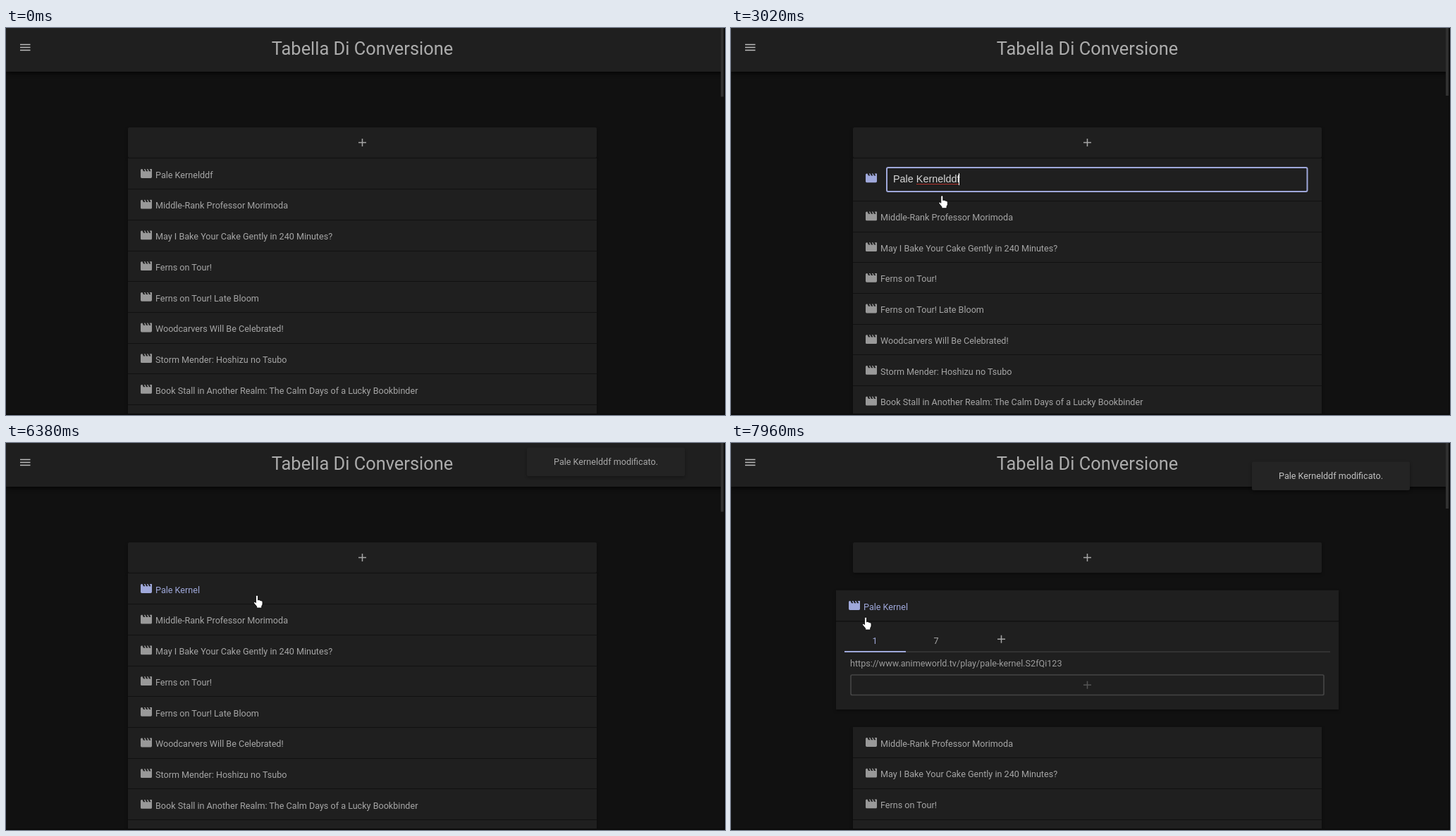
These frames come from a looping animation (1020 px wide and 549 px high, 8000 ms). An HTML page:

```html
<!DOCTYPE html>
<html lang="it">
<head>
<meta charset="utf-8">
<title>Tabella Di Conversione</title>
<style>
  html, body { margin: 0; width: 100%; height: 100%; overflow: hidden; background: #111; }
  svg { display: block; width: 1020px; height: 549px; font: 12.6px Roboto, sans-serif; }
  .field { font: 14.4px "Liberation Sans", Arial, sans-serif; }
  .shade { filter: drop-shadow(0 2px 2px rgba(0, 0, 0, .35)); }
</style>
</head>
<body>
<svg id="stage" viewBox="0 0 1020 549"></svg>
<script>
const LOOP = 8000, PITCH = 43.7, TOP = 185;
const PANEL = '#1f1f1f', BACK = '#111', GREY = '#a6a6a6', ACCENT = '#9fa8da';
const NAME = 'Pale Kernel';
const TITLES = [
  'Middle-Rank Professor Morimoda',
  'May I Bake Your Cake Gently in 240 Minutes?',
  'Ferns on Tour!',
  'Ferns on Tour! Late Bloom',
  'Woodcarvers Will Be Celebrated!',
  'Storm Mender: Hoshizu no Tsubo',
  'Book Stall in Another Realm: The Calm Days of a Lucky Bookbinder'
];
const MOVIE = 'M18 4l2 4h-3l-2-4h-2l2 4h-3l-2-4H8l2 4H7L5 4H4c-1.1 0-1.99.9-1.99 2L2 18c0 1.1.9 2 2 2h16c1.1 0 2-.9 2-2V4h-4z';
const HAND = 'M-1.5 1.5a1.5 1.5 0 0 1 3 0V7l1-.6 1.6.5.5.5 1.6.2.6.6c.9 0 1.2.5 1.2 1.5V13l-1.3 2.5V18h-7v-2L-4 11.5c-1-1.3.2-2.6 1.4-1.8l1.1 1z';
const ARROW = 'M0 0V15l3.5-3.3 2.2 5.2 2.2-1-2.2-5H10.5z';

// pointer path: time, x, y
const PATH = [[790, 133, 206], [860, 195, 202], [1000, 328, 189], [1260, 274, 206],
  [2130, 274, 206], [2540, 290.5, 241], [2890, 290.5, 241], [3460, 356, 216],
  [6930, 356, 216], [7070, 291.5, 216], [7820, 291.5, 216], [7960, 191, 247]];

const clamp = v => Math.max(0, Math.min(1, v));
const rect = (x, y, w, h, fill, more = '') =>
  `<rect x="${x}" y="${y}" width="${w}" height="${h}" fill="${fill}" ${more}/>`;
const text = (s, x, y, fill = GREY, more = '') =>
  `<text x="${x}" y="${Math.round(y)}" fill="${fill}" ${more}>${s}</text>`;
const plus = (x, y, color) =>
  `<path d="M${x - 5.5} ${y}h11M${x} ${y - 5.5}v11" stroke="${color}" stroke-width="1.5"/>`;
const movie = (x, y, color) =>
  `<path transform="translate(${x - 9.6} ${y - 9.6}) scale(.8)" d="${MOVIE}" fill="${color}"/>`;
const divider = y => rect(173, Math.round(y - .45), 665, 1, BACK);

function pointerAt(t) {
  if (t < PATH[0][0]) return null;
  const i = PATH.findIndex(k => k[0] > t);
  if (i < 0) return PATH[PATH.length - 1].slice(1);
  const [a, b] = [PATH[i - 1], PATH[i]];
  const u = (t - a[0]) / (b[0] - a[0]), e = u * u * (3 - 2 * u);
  return [a[1] + (b[1] - a[1]) * e, a[2] + (b[2] - a[2]) * e];
}

function header() {
  return rect(0, -10, 1020, 72, PANEL, 'style="filter:drop-shadow(0 2px 3px rgba(0,0,0,.8))"') +
    text('Tabella Di Conversione', 505.5, 38, '#acacac', 'text-anchor="middle" font-size="25.4"') +
    '<path d="M20 23.5h14.5M20 27.5h14.5M20 31.5h14.5" stroke="#bdbdbd" stroke-width="1.6"/>';
}

function rows(top) {
  let out = rect(173, top, 665, 600, PANEL);
  TITLES.forEach((title, i) => {
    const y = top + i * PITCH;
    out += movie(199, y + 21.5, '#999') + text(title, 212, y + 27.7);
  });
  for (let i = 1; i < 9; i++) out += divider(top + i * PITCH);
  return out;
}

function editRow(t) {
  const cut = [4250, 4520, 4980].filter(k => t >= k).length;
  const value = NAME + 'ddf'.slice(0, 3 - cut);
  const caret = [323.5, 320.5, 312.5, 304.5][cut];
  const caretOn = t < 3460 || t >= 4000;
  return rect(221, 198, 596.5, 34, 'none', `rx="2" stroke="${ACCENT}" stroke-width="2"`) +
    text(value, 230, 219, '#d8d8d8', 'class="field"') +
    (cut ? '' : rect(263, 221, 60, 1, '#b3322e')) +
    (caretOn ? rect(caret - .5, 206, 1, 17, '#fff') : '');
}

function card(p, color) {
  const x = 173 - 24 * p, y = TOP + 24 * p, w = 665 + 48 * p;
  const bar = Math.round(y + 87);
  return `<g class="shade">${rect(x, y, w, 169, PANEL)}</g>` +
    rect(x, Math.round(y + 43), w, 1.5, BACK) +
    movie(x + 26, y + 21.5, color) + text(NAME, x + 39, y + 27.7, color) +
    text('1', x + 55, y + 75.5, ACCENT, 'text-anchor="middle"') +
    text('7', x + 142, y + 75.5, GREY, 'text-anchor="middle"') +
    plus(x + 234.5, y + 69.3, GREY) +
    rect(x + 98, bar - .5, w - 110, 1.5, '#393939') +
    rect(x + 12, bar - 1, 87, 2, ACCENT) +
    text('https://www.animeworld.tv/play/pale-kernel.S2fQi123', x + 20, y + 108, '#9c9c9c') +
    rect(x + 21, y + 120, w - 42, 28.5, 'none', 'rx="2" stroke="#444" stroke-width="1.7"') +
    plus(505.5, y + 134.3, '#555');
}

function menu(active) {
  const item = (s, i) => text(s, 279.5, 224 + 24 * i, i === 1 && active ? '#8c8c8c' : '#d0d0d0');
  return `<g class="shade">${rect(274, 207, 47, 74, '#1d1d1d')}</g>` +
    rect(274, 231.5, 47, 1, BACK) + rect(274, 255.5, 47, 1, BACK) +
    ['Copy', 'Edit', 'Delete'].map(item).join('');
}

function toast(t) {
  const step = Math.floor((t - 6310) / 70);
  const u = clamp((step - 1) / 4);
  const dy = -20 * (1 - u) ** 2;
  return `<g transform="translate(0 ${dy})" opacity="${clamp(.5 + .35 * step)}">` +
    rect(739, 26.5, 224, 40.5, '#242424', 'rx="2" class="shade"') +
    text(NAME + 'ddf modificato.', 851, 51, '#c0c0c0', 'text-anchor="middle"') + '</g>';
}

function pointer([x, y], editing) {
  const at = `transform="translate(${x} ${y})"`;
  if (editing && x > 220 && y < 233)
    return `<path ${at} d="M-3 -6h2.2l.8.7.8-.7H3M0 -5.5V5.5M-3 6h2.2l.8-.7.8.7H3" fill="none" stroke="#ddd"/>`;
  return `<path ${at} d="${x < 173 ? ARROW : HAND}" fill="#fff" stroke="#000" stroke-width=".8"/>`;
}

function draw(t) {
  const menuOpen = t >= 1800 && t < 2890;
  const editing = t >= 2890 && t < 5580;
  const open = t >= 7350;
  const p = !open ? 0 : t < 7420 ? .25 : t < 7470 ? .57 : 1;
  const pos = pointerAt(t);

  const rowTop = TOP + 24 * p, rowHeight = editing ? 60 : PITCH;
  const inMenu = menuOpen && pos[1] > 207;
  const hover = pos && pos[0] > 173 && pos[1] >= rowTop && pos[1] < rowTop + rowHeight && !inMenu;
  const color = hover ? ACCENT : GREY;

  let out = rect(0, 0, 1020, 549, BACK);
  out += `<g class="shade">${rect(173, 141, 665, 43, PANEL, 'rx="2"')}</g>` + plus(505.5, 162.5, GREY);
  if (open) {
    out += `<g class="shade">${rows(355 + 48 * p)}</g>` + card(p, color);
  } else {
    const next = TOP + PITCH + (editing ? 16.7 : 0);
    out += `<g class="shade">${rect(173, 185, 665, 60, PANEL)}${rows(next)}</g>` +
      divider(TOP - .4) + divider(next) +
      movie(199, 206.5 + (editing ? 6.3 : 0), hover ? ACCENT : '#999');
    out += editing ? editRow(t) : text(NAME + (t < 5580 ? 'ddf' : ''), 212, 212.7, color);
  }
  out += header();
  if (t >= 6310) out += toast(t);
  out += rect(1014, 0, 4, open ? 93 : editing ? 96 : 97.5, '#303030') +
    rect(1018, 0, 2, 549, '#0b0b0b') + rect(0, 547, 1020, 2, '#0b0b0b');
  if (menuOpen) out += menu(pos[1] > 232);
  if (t >= 1660 && t < 1800) out += '<circle cx="273" cy="205.5" r="9.5" fill="#ff0" opacity=".47"/>';
  if (pos) out += pointer(pos, editing);
  return out;
}

const stage = document.getElementById('stage');
let last = '';
function frame() {
  const next = draw(performance.now() % LOOP);
  if (next !== last) stage.innerHTML = last = next;
  requestAnimationFrame(frame);
}
frame();
</script>
</body>
</html>
```
